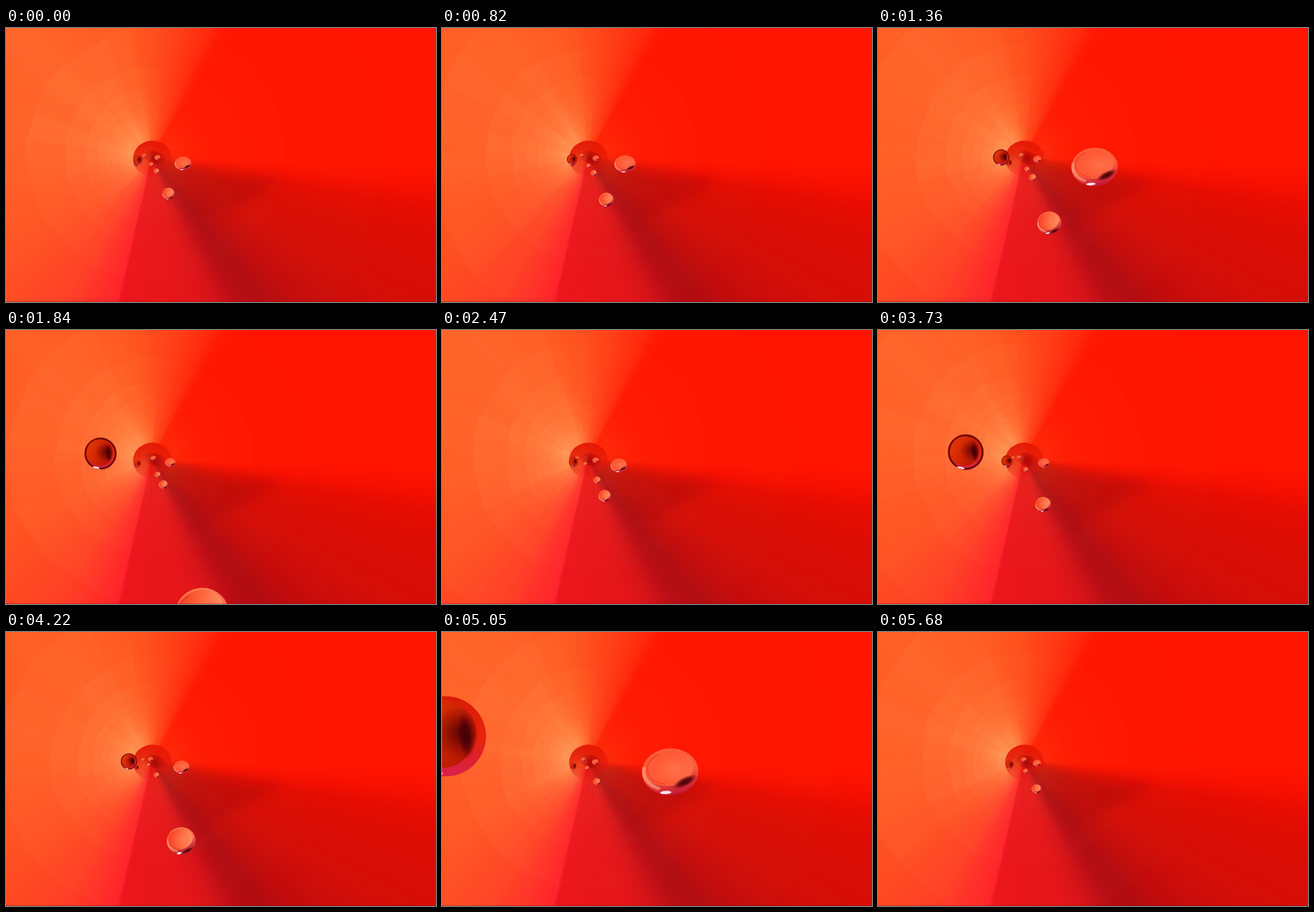
An HTML page with a canvas for the animation above (5880 ms loop, 599x382 px).

```html
<!DOCTYPE html>
<html lang="en">
<head>
<meta charset="utf-8">
<title>Blood cells in a vessel</title>
<style>
html, body { margin: 0; width: 100%; height: 100%; overflow: hidden; background: #ff1400; }
canvas { display: block; width: 599px; height: 382px; }
</style>
</head>
<body>
<canvas id="stage" width="599" height="382"></canvas>
<script>
const W = 599, H = 382, LOOP = 5880, HOLD = 610, STEPS = 74, STEP_MS = 69.45, LEAD = 21;
const CX = 203, CY = 180, TAU = Math.PI * 2;
const ctx = document.getElementById('stage').getContext('2d');

// Wall colour by direction, degrees clockwise from straight up.
const WALL = [
  [0, '#ff4a1a'], [12, '#ff3c15'], [24, '#ff280c'], [29, '#ff1802'], [33, '#ff1400'],
  [92, '#ff1400'], [96, '#f81000'], [101, '#e60c02'], [108, '#da0d04'], [122, '#d40e08'],
  [134, '#c30c0c'], [143, '#b00c12'], [149, '#b80c14'], [157, '#d71218'], [165, '#e41418'],
  [180, '#e81418'], [192, '#ec141c'], [193.5, '#ff2229'], [200, '#ff2c28'], [213, '#ff4025'],
  [235, '#ff5022'], [270, '#ff5c24'], [315, '#ff6026'], [345, '#ff5820'], [360, '#ff4a1a']
];

// Lanes give the screen position for a cell radius: [radius, x, y].
const LANES = {
  right: [[2.5, 190, 178], [3.4, 201, 177], [4.2, 212, 181], [5.7, 222, 183],
          [11.7, 246.5, 189], [33, 303.5, 194], [54, 351.5, 197]],
  down: [[2.9, 203, 191], [3.8, 210, 200], [5, 215.5, 208.5], [6.7, 221, 219],
         [8.7, 226.5, 231.5], [17, 239, 273], [20, 244, 291]],
  left: [[2.5, 181, 190], [4, 183, 187], [5.8, 184, 184], [11, 172, 180.5],
         [12.4, 168.5, 180], [57, 3, 145]]
};

// Lane, step at which the cell reaches the viewer, speed.
const CELLS = [
  ['right', 18.8, .00455], ['right', 43.3, .0056], ['right', 69.8, .0053],
  ['right', 107, .0054], ['right', 127, .0053],
  ['down', 24.7, .0047], ['down', 49.3, .0054], ['down', 61.6, .0058],
  ['down', 100.8, .0056], ['down', 130, .0056],
  ['left', 26, .0064], ['left', 52, .0067], ['left', 68, .0059], ['left', 105, .0062]
];

const LOOKS = {
  right: { flat: .83, tilt: -.06, rim: ['#ff5f3c', '#ff5a3c', '#c01838'], dish: ['#ff5a38', '#ff5a36', '#ff6a48'],
           dark: [.5, .46, .5, .2, -.5], shine: [-.2, .87, .2, .07] },
  down: { flat: .95, tilt: -.2, rim: ['#ff7c50', '#ff6a48', '#a0102c'], dish: ['#f84a2a', '#ff6840', '#ff9468'],
          dark: [.3, .77, .45, .13, -.25], shine: [-.3, .85, .17, .07] },
  left: { flat: .99, tilt: .2, rim: ['#d81c08', '#e82408', '#d8204c'], dish: ['#e03206', '#cc2203', '#b01402'],
          dark: [.48, -.12, .22, .6, -.3], shine: [-.1, .93, .22, .06] }
};

const noise = n => { const s = Math.sin(n * 127.1 + 11.7) * 43758.5453; return s - Math.floor(s); };

function fillEllipse(c, x, y, rx, ry, angle, fill) {
  c.fillStyle = fill;
  c.beginPath();
  c.ellipse(x, y, rx, ry, angle, 0, TAU);
  c.fill();
}

function withStops(gradient, colours) {
  colours.forEach((colour, i) => gradient.addColorStop(i / (colours.length - 1), colour));
  return gradient;
}

function makeWall() {
  const wall = document.createElement('canvas');
  wall.width = W;
  wall.height = H;
  const c = wall.getContext('2d');
  const sweep = c.createConicGradient(-Math.PI / 2, CX, CY);
  for (const [deg, colour] of WALL) sweep.addColorStop(deg / 360, colour);
  c.fillStyle = sweep;
  c.fillRect(0, 0, W, H);
  c.filter = 'blur(8px)';
  c.fillStyle = 'rgba(140,0,14,.25)';
  c.beginPath();
  for (const [x, y] of [[208, 180], [285, 202], [385, 212], [330, 245], [275, 270]]) c.lineTo(x, y);
  c.fill();
  return wall;
}
const wall = makeWall();

// One wall ring: a fan of facets, brightest towards the lit upper left.
function drawRing(radius, seed) {
  const sides = 30, turn = noise(seed);
  const corner = i => {
    const a = (i + turn) / sides * TAU, r = radius * (.975 + .05 * noise(seed * 31 + i % sides));
    return [CX + radius * .03 + r * Math.cos(a), CY - radius * .02 + r * Math.sin(a)];
  };
  for (let i = 0; i < sides; i++) {
    const light = Math.max(0, Math.cos((i + turn + .5) / sides * TAU - 3.4));
    const alpha = .006 + .046 * light * (.6 + .8 * noise(seed * 57 + i));
    ctx.fillStyle = `rgba(255,205,140,${alpha})`;
    ctx.beginPath();
    ctx.moveTo(CX, CY);
    ctx.lineTo(...corner(i));
    ctx.lineTo(...corner(i + 1));
    ctx.fill();
  }
}

function drawRings(step) {
  const gap = .0024, travel = .0008 - .000925 * step;
  const first = Math.ceil((.0026 - travel) / gap);
  for (let n = first; travel + n * gap < .03; n++) drawRing(1 / (travel + n * gap), n % 17);
}

function drawHole() {
  const shade = withStops(ctx.createLinearGradient(196, 157, 208, 207),
    ['rgba(228,20,3,.95)', 'rgba(228,26,5,.85)', 'rgba(225,22,10,.45)', 'rgba(220,10,10,0)']);
  fillEllipse(ctx, 204, 182, 27, 25, 0, shade);
  const core = withStops(ctx.createRadialGradient(208, 181, 0, 208, 181, 17), ['rgba(135,0,12,.6)', 'rgba(150,0,12,0)']);
  fillEllipse(ctx, 208, 181, 17, 9, .3, core);
}

function place(lane, radius) {
  const points = LANES[lane];
  let i = 1;
  while (i < points.length - 1 && radius > points[i][0]) i++;
  const [r0, x0, y0] = points[i - 1], [r1, x1, y1] = points[i];
  const k = (radius - r0) / (r1 - r0);
  return [x0 + (x1 - x0) * k, y0 + (y1 - y0) * k];
}

function drawLitDish(dish) {
  fillEllipse(ctx, -.04, -.16, .88, .76, -.12, dish);
  fillEllipse(ctx, .04, -.1, .66, .54, -.12,
    withStops(ctx.createRadialGradient(.15, -.1, 0, .1, -.1, .68), ['rgba(255,135,90,.55)', 'rgba(255,115,70,0)']));
  ctx.lineWidth = .13;
  ctx.strokeStyle = 'rgba(255,165,130,.6)';
  ctx.beginPath();
  ctx.ellipse(-.02, -.06, .92, .84, 0, 2, 3.4);
  ctx.stroke();
  ctx.lineWidth = .06;
  ctx.strokeStyle = 'rgba(225,40,20,.4)';
  ctx.beginPath();
  ctx.ellipse(-.02, -.16, .8, .68, -.12, 1.9, 4.4);
  ctx.stroke();
}

function drawShadedDish(dish) {
  fillEllipse(ctx, -.08, -.04, .8, .84, -.2, dish);
  fillEllipse(ctx, .2, -.15, .55, .72, -.35,
    withStops(ctx.createRadialGradient(.38, -.18, 0, .28, -.15, .65), ['rgba(70,0,0,.85)', 'rgba(90,0,0,0)']));
}

function drawCell({ lane, radius }) {
  const look = LOOKS[lane], [x, y] = place(lane, radius);
  ctx.save();
  ctx.translate(x, y);
  ctx.rotate(look.tilt);
  ctx.scale(radius, radius * look.flat);
  fillEllipse(ctx, 0, 0, 1, 1, 0, withStops(ctx.createLinearGradient(-.2, -1, .2, 1), look.rim));
  ctx.clip();
  if (lane === 'left' && radius < 25) {
    ctx.strokeStyle = 'rgba(70,0,0,.75)';
    ctx.lineWidth = .22;
    ctx.stroke();
  }
  const dish = withStops(ctx.createLinearGradient(-.7, -.2, .8, .2), look.dish);
  (lane === 'left' ? drawShadedDish : drawLitDish)(dish);
  const [dx, dy, drx, dry, da] = look.dark;
  ctx.save();
  ctx.translate(dx, dy);
  ctx.rotate(da);
  ctx.scale(drx, dry);
  fillEllipse(ctx, 0, 0, 1, 1, 0,
    withStops(ctx.createRadialGradient(0, 0, 0, 0, 0, 1), ['rgba(60,0,6,.95)', 'rgba(75,0,8,.8)', 'rgba(130,0,14,0)']));
  ctx.restore();
  const [sx, sy, srx, sry] = look.shine;
  fillEllipse(ctx, sx, sy, srx, sry, 0, '#ffe3e6');
  ctx.restore();
}

function draw(time) {
  const t = time % LOOP;
  const step = t < HOLD ? 0 : Math.min(STEPS, 1 + Math.floor((t - HOLD + LEAD) / STEP_MS));
  ctx.drawImage(wall, 0, 0);
  drawRings(step);
  drawHole();
  CELLS.map(([lane, arrival, speed]) => ({ lane, radius: 1 / (speed * (arrival - step)) }))
    .filter(cell => cell.radius > 2.2 && cell.radius < 300)
    .sort((a, b) => a.radius - b.radius)
    .forEach(drawCell);
  ctx.fillStyle = 'rgba(120,0,0,.3)';
  ctx.fillRect(0, H - 1, W, 1);
}

const start = performance.now();
function tick() {
  draw(performance.now() - start);
  requestAnimationFrame(tick);
}
tick();
</script>
</body>
</html>
```
